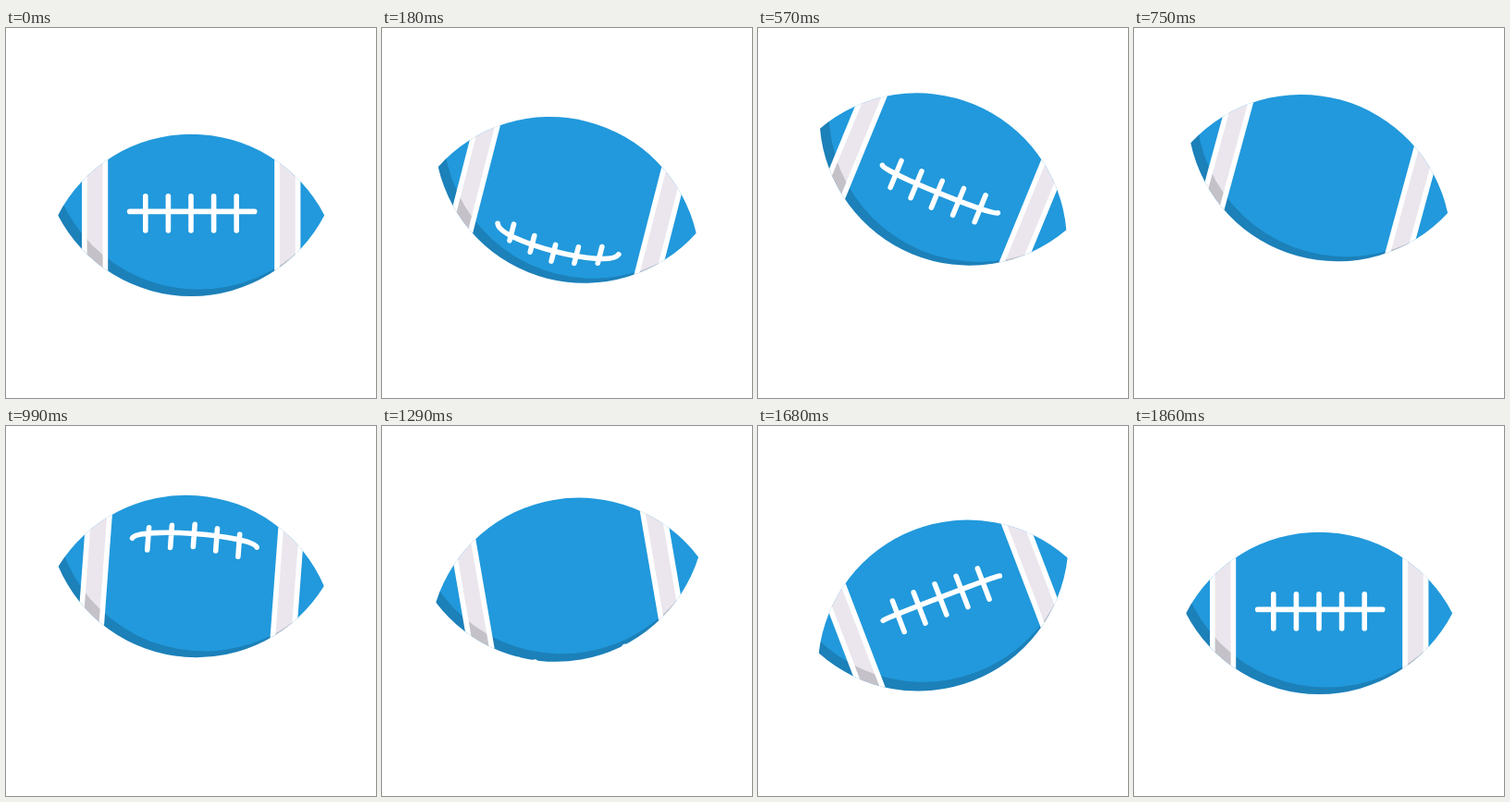
An HTML page for the animation above (3920 ms loop, 400 by 400 pixels).

```html
<!DOCTYPE html>
<html lang="en">
<head>
<meta charset="utf-8">
<title>Spinning ball</title>
<style>
  html, body { margin: 0; width: 100%; height: 100%; overflow: hidden; background: #fff; }
  svg { display: block; width: 100%; height: 100%; }
  #laces { fill: none; stroke: #fff; stroke-width: 5.6; stroke-linecap: round; }
</style>
</head>
<body>
<svg viewBox="0 0 400 400">
  <defs>
    <clipPath id="lens"><path d="M-144 0A162.2 162.2 0 0 1 144 0A162.2 162.2 0 0 1 -144 0Z"/></clipPath>
  </defs>
  <g id="ball" transform="translate(200.2 202.4)">
    <g clip-path="url(#lens)">
      <path fill="#2199dc" d="M-150-100H150V100H-150Z"/>
      <path fill="#ebe6ee" d="M-115-100h22v200h-22ZM93-100h22v200h-22Z"/>
      <!-- everything outside the offset circle is shaded -->
      <path fill="#000" fill-opacity=".16" fill-rule="evenodd"
        d="M-300-300H300V300H-300ZM-154.2-82a162.2 162.2 0 0 1 324.4 0a162.2 162.2 0 0 1-324.4 0Z"/>
      <path stroke="#fff" stroke-width="5.6" d="M-115.4-100v200M-92.8-100v200M92.8-100v200M115.4-100v200"/>
    </g>
    <path id="laces"/>
  </g>
</svg>
<script>
  const LOOP = 3920, STEP = 30, LAST = 62;
  const ball = document.getElementById('ball');
  const laces = document.getElementById('laces');
  const mix = (a, b, k) => a + (b - a) * k;

  // cubic-bezier(x1, 0, x2, 1)
  const ease = (x1, x2) => u => {
    let lo = 0, hi = 1;
    for (let i = 0; i < 24; i++) {
      const s = (lo + hi) / 2, r = 1 - s;
      if (3 * r * r * s * x1 + 3 * r * s * s * x2 + s ** 3 < u) lo = s; else hi = s;
    }
    return lo * lo * (3 - 2 * lo);
  };

  // Segments: [start, end, from, to, easing]
  const track = segments => n => {
    const [t0, t1, a, b, f] = segments.find(s => n < s[1]) || segments[segments.length - 1];
    return mix(a, b, f(Math.min(1, (n - t0) / (t1 - t0))));
  };
  const linear = u => u;

  const height = track([
    [0, 27, 202.4, 162, ease(.333, 0)],
    [27, LAST, 162, 202.4, ease(1, .667)]
  ]);
  const tilt = track([
    [0, 15, 0, 25, ease(.333, .3)],
    [15, 55, 25, -22.2, ease(.167, .833)],
    [55, LAST, -22.2, 0, ease(.333, .667)]
  ]);
  // The laces roll down, leave at the bottom and return at the top.
  const roll = track([
    [0, 9.5, 0, 122, u => u ** 1.5],
    [9.5, 27.8, -119, 148, linear],
    [27.8, 45, -118, 133, linear],
    [45, LAST, -118, 0, u => 1 - (1 - u) ** 3]
  ]);

  function lacePath(y) {
    const end = y * .77 - 4, bend = y * 1.077 - 4;
    let d = `M-66.5 ${end}C-61 ${bend} 62 ${bend} 68.5 ${end}`;
    const half = Math.max(2, 18.6 - .155 * Math.abs(y));
    for (let i = -2; i <= 2; i++) {
      const mid = y * (1 - .17 * (Math.abs(i) / 2) ** 1.4) - 2;
      d += `M${i * 24.6 - .2} ${mid - half}v${2 * half}`;
    }
    return d;
  }

  function draw(now) {
    const n = Math.min(LAST, Math.floor(now % LOOP / STEP));
    ball.setAttribute('transform', `translate(200.2 ${height(n)}) rotate(${tilt(n)})`);
    laces.setAttribute('d', lacePath(roll(n)));
  }

  let start;
  function tick(now) {
    start ??= now;
    draw(now - start);
    requestAnimationFrame(tick);
  }
  draw(0);
  requestAnimationFrame(tick);
</script>
</body>
</html>
```
